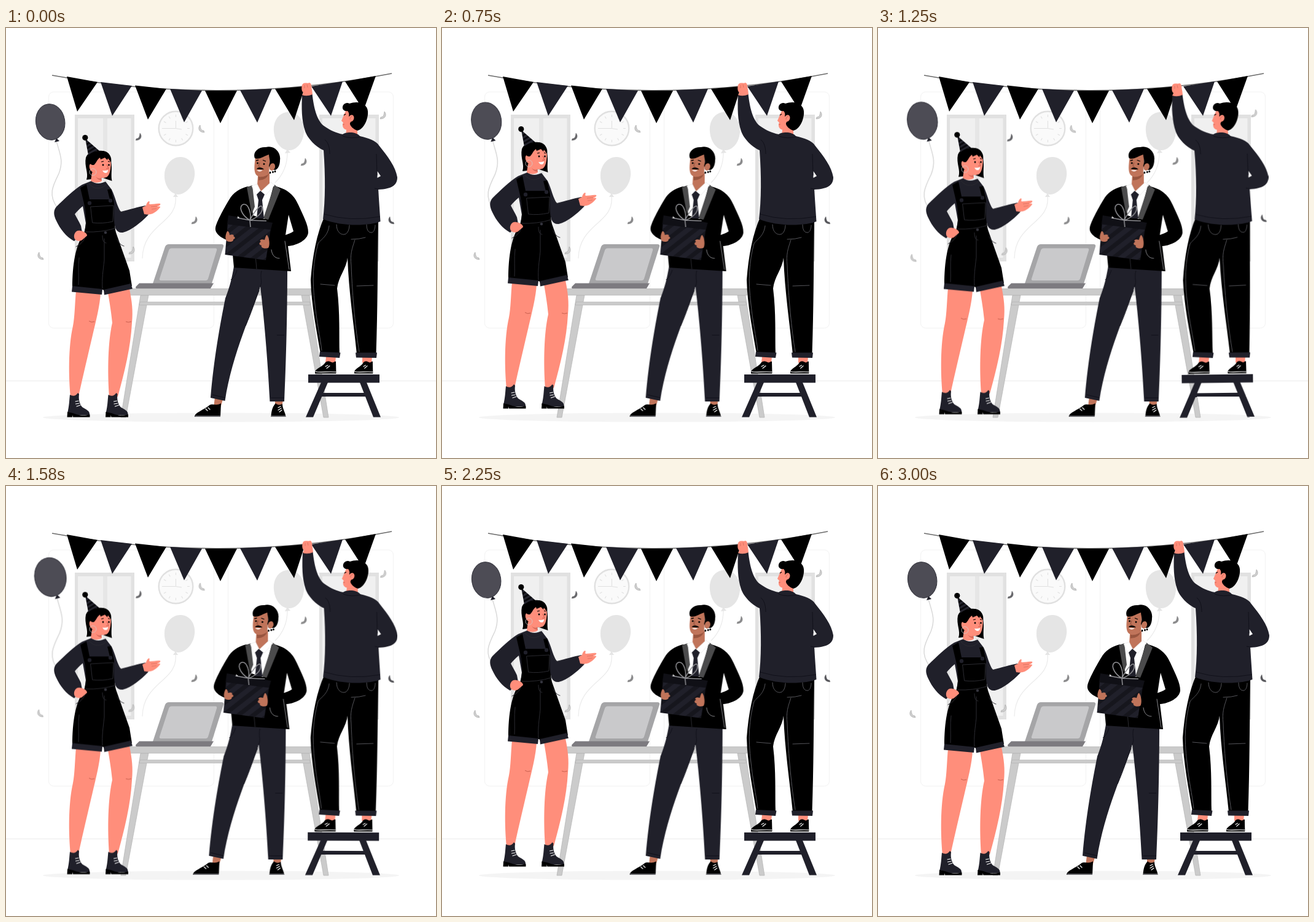
These frames come from a looping animation (700x700 px, 3040 ms). An HTML page:

```html
<!DOCTYPE html>
<html lang="en">
<head>
<meta charset="utf-8">
<title>Party preparations</title>
<style>
html, body { margin: 0; width: 100%; height: 100%; overflow: hidden; background: #fff; }
svg { display: block; width: 100%; height: 100%; }
.navy { fill: #20202a; }
.skin { fill: #ff8e7b; }
.tan { fill: #c0745a; }
.line { fill: none; stroke: #2c2c32; stroke-width: 1; stroke-linecap: round; }
.white { fill: #fff; }
.lace { fill: none; stroke: #fff; stroke-width: 1.2; stroke-linecap: round; }
.string { fill: none; stroke: #ececec; stroke-width: 1.3; }
.metal { fill: #cbcbcb; stroke: #b2b2b2; stroke-width: .7; }
</style>
</head>
<body>
<svg viewBox="0 0 700 700">
  <defs>
    <pattern id="stripes" width="15" height="15" patternUnits="userSpaceOnUse" patternTransform="rotate(52)">
      <rect width="15" height="15" fill="#20202a"/><rect width="7" height="15" fill="#16161d"/>
    </pattern>
    <pattern id="hatStripes" width="6" height="6" patternUnits="userSpaceOnUse" patternTransform="rotate(60)">
      <rect width="6" height="6" fill="#24242e"/><rect width="3" height="6" fill="#08080c"/>
    </pattern>
    <path id="bit" d="M2-6C6-2 5 6-5 6L-4 3C1 3 1-1 2-6Z"/>
    <g id="window">
      <rect x="112" y="141" width="97" height="239" fill="#e1e1e1"/>
      <path d="M117 147H158.500V374H117ZM165 147H203.500V374H165Z" fill="#f0f0f0"/>
      <path d="M158.500 147H165V374H158.500Z" fill="#e6e6e6"/>
    </g>
    <g id="boot">
      <path class="navy" d="M104 597C109 600 114 599 117 594L119 596C118 603 119 611 124 617C130 621 137 623 136 630H108L100 627C103 615 103 606 104 597Z"/>
      <path d="M100 625L109 627L115 629C122 631 130 631 136.500 629V633.500H109L108 630V633.500H99.500Z"/>
      <path class="lace" d="M113 608L118 607M113.500 612L119 611M115 616L121 614"/>
    </g>
    <g id="shoe">
      <path d="M503 562C502 555 512 553 518 547C521 541 526 542 530 544C533 546 535 542 537 543L537.500 562.500H503Z"/>
      <path class="lace" d="M504 559.500C512 561 524 559 537 560M520 551L524 549M522 554L527 550"/>
    </g>
  </defs>

  <!-- room -->
  <path d="M0 574.500H700" stroke="#ebebeb"/>
  <g fill="none" stroke="#f2f2f2">
    <rect x="69.500" y="104" width="269" height="384.500" rx="8"/>
    <rect x="361.500" y="104" width="269" height="384.500" rx="8"/>
  </g>
  <use href="#window"/>
  <use href="#window" x="398"/>
  <circle cx="276.500" cy="163.500" r="27.800" fill="#fafafa" stroke="#e0e0e0" stroke-width="2.400"/>
  <path d="M276.500 163.500H256M276.500 163.500L286 165M276.500 163.500V151" fill="none" stroke="#e0e0e0"/>
  <g id="ticks" stroke="#e0e0e0"></g>
  <path class="string" d="M276 274C281 318 223 318 222 375M458 203C458 223 452 238 438 252"/>
  <g fill="#e5e5e5">
    <path d="M285 210C300 211 309 225 307 241C305 258 292 271 280 271C266 270 257 254 258 238C259 222 271 209 285 210Z"/>
    <path d="M276 269L272 275H280Z"/>
    <path d="M457 137C472 134 484 148 485 164C486 182 476 198 462 199C448 200 437 185 436 168C435 152 443 139 457 137Z"/>
    <path d="M458 197L454 204L463 203Z"/>
  </g>
  <ellipse cx="350" cy="634" rx="290" ry="7.500" fill="#f4f4f4"/>

  <!-- table and laptop -->
  <g class="metal">
    <path d="M219 435H232L195 634H187ZM481 435H494L525 634H517Z"/>
    <path d="M218 446H495V451H217Z"/>
    <path d="M196 424.500H497V435H196Z"/>
  </g>
  <path d="M265 352H351Q355 352 354 356L335 416H239L259 356Q261 352 265 352Z" fill="#a5a5a7"/>
  <path d="M270 358.500H341Q344 358.500 343 362L329 408Q328 411 325 411H252Q249 411 250 408L265 362Q266 358.500 270 358.500Z" fill="#c9c9cb"/>
  <path d="M217 415.500H338L333 424H213Q210 424 211.500 421Z" fill="#7d7b80"/>

  <path d="M75 77Q351 128 628 74" fill="none" stroke="#6b6b6b" stroke-width="1.500"/>
  <g id="flags"></g>
  <g id="confetti"></g>

  <g id="balloon">
    <path d="M82 184C88 206 94 216 86 237C76 257 68 272 84 293" fill="none" stroke="#d9d9d9" stroke-width="1.500"/>
    <path d="M82 179L79 186L87 184Z" fill="#20202a"/>
    <ellipse cx="72.200" cy="153" rx="23.600" ry="29.300" transform="rotate(-9 72 153)" fill="#4d4c55" stroke="#33333c"/>
  </g>

  <g id="woman">
    <path class="skin" d="M114 427L154 431C153 452 146 478 141 500C134 530 125 568 118 600H105C102 570 101 520 109 485C112 470 112 450 114 427Z"/>
    <path class="skin" d="M166 431L201 425C205 445 207 460 205 480C203 520 193 560 182 600H168C165 560 166 510 173 480C171 460 169 450 166 431Z"/>
    <path d="M135 477Q139 480 144 478M195 478Q199 480 204 478" fill="none" stroke="#c9604f"/>
    <use href="#boot"/>
    <use href="#boot" x="62.500"/>

    <path class="navy" d="M124 255L139 249C146 255 156 253 162 250L172 263C178 275 181 292 187 299C200 296 215 291 227 289C233 293 234 301 231 305C219 317 205 329 190 333C180 334 176 326 176 310L178 334L127 338L130 318L125 290C119 295 115 299 112 303C115 309 119 315 122 322L124 333L111 347C98 340 88 327 82 314C77 304 77 297 82 291C95 278 112 262 124 255Z"/>
    <path class="line" d="M134 252C143 265 157 262 164 254M180 292C184 299 188 301 193 299"/>
    <path d="M121 260L131 254.500L136 279H169L165 263L171 262L176 285C176 298 174 310 179 333L201 395L205 420L160 428L158 426L108 423C108 385 113 354 127 334C132 319 130 303 128 290Z"/>
    <path class="navy" d="M108 420L157 425L156 434L107 429.500ZM159 426L203 416L206 424.500L160 434.500Z"/>
    <path class="line" d="M138 291L175 289L174 315Q157 319 141 317ZM130 332Q155 333 178 326M119 374C117 390 119 405 118 418M160 343V378C158 395 156 408 157 424M114 356Q127 350 130 337M181 344C183 350 188 354 192 355M157 338C157 347 159 349 163 350"/>
    <circle class="navy" cx="136" cy="285" r="3.200"/><circle class="navy" cx="170" cy="281" r="3.200"/>
    <circle cx="162" cy="333" r="2.300" fill="#34343d"/>

    <path class="skin" d="M121 330C114 328 110 335 111 341C112 347 120 348 124 345L132 338C132 334 127 331 121 330Z"/>
    <path class="skin" d="M222 292L228 289C229 285 231 282 233 282C235 283 232 286 234 287C240 287 247 285 251 286C253 288 247 290 246 291C250 290 253 291 250 293C247 297 243 300 239 302C234 304 228 304 225 303Z"/>
    <path d="M236 291L246 290M237 295L245 294" stroke="#d2695a" stroke-width=".7"/>

    <path d="M131 247C135 236 127 225 130 211C133 202 145 199 157 200C168 202 172 214 172 226C172 235 171 242 172.500 249L158 244Z"/>
    <path class="skin" d="M140 235L154 240L156 249C151 253 143 252 138 249Z"/>
    <path d="M146 242Q150 246 155 244L156 248Q150 248 146 242Z" fill="#d96b5b"/>
    <path class="skin" d="M139 222C136 219 134 227 138 232L143 237C147 244 159 246 165 242C170 238 172 223 170 211L150 207Z"/>
    <path d="M136 220C136 206 147 200 158 200C168 201 173 211 171 219L166 212L165 215L161 211L154 214L153 211C148 214 147 220 143 223L140 223Z"/>
    <path d="M155 218L159 217M166 217L169 218" stroke="#000" stroke-width="1.100"/>
    <circle cx="158" cy="223" r="1.400"/><circle cx="167.500" cy="223" r="1.400"/>
    <path d="M164 222L167 229L163 229" fill="none" stroke="#cf5b4d"/>
    <path class="white" d="M157 232Q162 233 166 231Q166 236 162 236Q159 236 157 232Z"/>
    <circle cx="141.500" cy="234.500" r="5.500" fill="none" stroke="#cfcfcf" stroke-width=".8"/>
    <path d="M129 180L152 200Q142 200 134 207Z" fill="url(#hatStripes)"/>
    <circle cx="128.800" cy="178.600" r="4.600"/>
  </g>

  <g id="host">
    <path class="tan" d="M340 601L353 605L349 618H338ZM438 606H451L449 617L438 615Z"/>
    <path d="M307 632C308 626 321 622 330 615C335 610 342 616 350 611L349 633H307Z"/>
    <path d="M431.500 633C432 621 435 615 439 611C443 615 447 613 450 612C450 620 455 626 455.500 633Z"/>
    <path d="M307.500 632H349M432 632H455" stroke="#66666b" stroke-width="2"/>
    <path class="lace" d="M329 618L332 621M325 620L328 623M443 618L447 616M443 622L448 619M445 625L449 622"/>
    <path class="navy" d="M371 388L458 392C458 440 457 520 453 608H429.500C426 540 420 470 414 421C403 457 368 530 356.500 607L333 602C338 540 349 480 357 440C365 420 368 405 371 388Z"/>
    <path d="M336 597L357 602M431 602H453M376 394C374 402 370 407 366 410M412 427C405 445 400 462 390 485M416 395C413 408 418 411 414 421M441 500H453" fill="none" stroke="#11111a"/>

    <path d="M393 258L440 258C460 263 470 274 476 288C484 306 492 320 492 333C491 345 474 354 459 355L464 396L371 390L367 347C355 345 339 336 341 325C343 315 354 295 363 280C370 267 380 262 393 258Z"/>
    <path class="white" d="M460 304L468 331C464 334 459 335 455 337Z"/>
    <path class="line" style="stroke:#88888c" d="M454 347L461 393M432 361C433 370 438 375 445 375"/>
    <path class="line" d="M406 370L408 392"/>
    <path class="white" d="M400 257L436 255L421 311L402 305Z"/>
    <path d="M392 259L401 256L405 291L400 303ZM437 255L447 263L427 312L419 310Z" fill="#4b4b4c"/>
    <path class="tan" d="M410 241L429 236L429 256L416 267L409 257Z"/>
    <path d="M411 242Q421 243 428 237Q424 248 411 248Z" fill="#98553f"/>
    <path class="white" d="M409 254L415 266L407 273L400 257ZM431 251L437 256L423 272L415 266Z" stroke="#ddd" stroke-width=".5"/>
    <path class="navy" d="M408 271L414 265L421 271L417 280L420 310H408L411 280Z"/>

    <path class="tan" d="M406 209C405 219 403 230 406 237C410 245 422 243 428 237L430 205Z"/>
    <path d="M405 212C401 202 411 193 423 194C436 190 448 202 446 215C446 223 443 229 439 231L430 231L428 224C431 216 428 211 428 206C421 208 412 215 405 212Z"/>
    <ellipse class="tan" cx="433.500" cy="226" rx="4.500" ry="6" transform="rotate(15 433 226)"/>
    <path d="M408 230C409 226 416 226 420 230C416 231 411 229 408 230Z"/>
    <path class="white" d="M408 231Q413 232 418 231Q413 236 408 231Z"/>
    <circle cx="409.500" cy="220" r="1.400"/><circle cx="420" cy="221.500" r="1.400"/>
    <path d="M407 216L411 215M418 215L423 217" stroke="#000" stroke-width="1.300"/>
    <path d="M413 219L411 225L414 226" fill="none" stroke="#8b4b38"/>
    <path d="M430 235V236M434.500 234V235M438 233V234" stroke="#000" stroke-width="2.600" stroke-linecap="round"/>

    <path d="M361 317L431 327L423 378L356.500 369Z" fill="url(#stripes)"/>
    <path d="M362 305L434 317L431 328.500L360 319.500Z" fill="#101016"/>
    <path d="M397 313C382 304 378 289 387 287C395 286 400 303 397 313C404 299 416 284 417 292C419 301 407 310 397 313L376 309M397 313L424 314M397 313L398 324" fill="none" stroke="#8d8d91" stroke-width="1.600"/>
    <path class="white" d="M377 306L380 309L378 310Z"/>
    <path class="tan" d="M360 331C362 330 364 334 364 337C368 335 373 337 370 339C374 340 373 344 370 344C371 348 364 349 360 347C356 344 357 336 360 331Z"/>
    <path class="tan" d="M425 337C423 337 422 342 421 345C416 343 411 346 415 348C411 350 412 353 416 354C414 358 422 360 427 358C430 354 429 342 425 337Z"/>
  </g>

  <g id="decorator">
    <path class="navy" d="M513 577H524L500 633.500H488ZM576 577H587L610 633.500H598ZM512 594H586V600H512Z"/>
    <rect class="navy" x="492" y="564" width="116" height="13.500"/>
    <path class="skin" d="M521 535H537L536 546L520 545ZM580 535H596L595 546L580 545Z"/>
    <use href="#shoe"/>
    <use href="#shoe" transform="translate(567 0) scale(.88 1) translate(-503 0)"/>
    <path d="M518 308L606 312C605 390 605 460 602.500 531H571C566 480 558 430 556 374C554 392 541 405 539 424C544 465 542 500 543 531L512 530C506 495 497 450 496 410C499 370 506 335 518 308Z"/>
    <path class="navy" d="M511 527L544.500 528.500L543 537L510 535ZM569 528.500H604L603 537L570 536.500Z"/>
    <path class="line" style="stroke:#55555a" d="M526 322C524 340 511 345 508 351C500 380 498 410 503 450C506 480 511 500 514 525M512 417L535 419M571 420L598 419M538 320C538 332 545 337 551 336C557 335 559 326 559 321M587 320C587 329 590 333 595 333C599 333 601 326 601 321M562 344Q575 344 585 341M568 345C563 360 560 368 562 387C564 440 569 490 575 527"/>
    <path class="skin" d="M555 158L572 164V175H553Z"/>
    <path class="navy" d="M482 108L498.500 107C501 130 506 150 517 159C528 167 538 171 548 173C553 169 570 168 576 176C590 179 603 184 607 191C622 210 634 225 637 243C637 256 628 262 606 263L609.500 315C595 321 550 325 516 311C520 280 520 240 517 199C505 194 491 180 487 168C481 150 481 130 482 108Z"/>
    <path class="white" d="M604.500 233L610 241L604.500 244Z"/>
    <path d="M548 176Q562 181 577 177M603 205L604 240M527 205C527 190 522 184 519 182M606 262L600 261M518 303Q560 316 609 307" fill="none" stroke="#11111a"/>
    <path class="skin" d="M482 109L484 105C480 102 481 94 483 91C487 88 491 91 494 89C498 90 497 97 498 100L499 108Q490 112 482 109Z"/>
    <path d="M486 93V98M490 92L491 97" stroke="#d2695a" stroke-width=".7"/>
    <path class="skin" d="M556 132C551 136 550 143 546 151L549 154C547 158 548 163 552 165C556 167 563 166 571 168L574 148L565 133Z"/>
    <path d="M548 131C547 124 554 120 559 123C567 120 578 120 583 125C591 130 590 141 587 150C584 159 578 166 572 167C567 166 559 159 560 155L565 145L558 144C559 140 558 137 556 135C552 136 549 134 548 131Z"/>
    <ellipse class="skin" cx="562" cy="147" rx="4.400" ry="5.700" transform="rotate(18 562 147)"/>
    <path d="M560 149Q560 144 564 144M548 157H551" fill="none" stroke="#d2695a"/>
    <path d="M550 142L553 140" stroke="#000" stroke-width="1.400"/>
  </g>
</svg>
<script>
const $ = id => document.getElementById(id);
const LOOP = 3040, CYCLE = 3000;
const LEAD = 20; // the motion is already under way at load

function add(parent, tag, attrs) {
  const el = document.createElementNS("http://www.w3.org/2000/svg", tag);
  for (const key in attrs) el.setAttribute(key, attrs[key]);
  $(parent).append(el);
}

for (let i = 0; i < 12; i++)
  add("ticks", "path", { d: "M276.5 141V145", transform: `rotate(${i * 30} 276.5 163.5)` });

// left x, left y, right x, right y, tip x, tip y
[
  [99, 79, 149, 88, 116, 136], [154, 88, 205, 94, 173, 143],
  [210, 93.5, 261, 99, 231, 149], [267, 99, 319, 102, 290, 153.500],
  [324, 102, 376, 102, 349, 155], [381, 101, 433, 99, 409, 154],
  [438, 99, 487, 95, 469, 150], [497, 95, 548, 87, 529, 143],
  [552, 87, 602, 78, 582, 134]
].forEach((p, i) => add("flags", "polygon", { points: p, fill: i % 2 ? "#20202a" : "#000" }));

// x, y, mirror, colour
[
  [216, 177, 1, "#66666a"], [318, 164, -1, "#cfcfcf"], [307, 313, 1, "#8a8a8c"],
  [485, 218, 1, "#8a8a8c"], [614, 142, 1, "#cfcfcf"], [627, 313, -1, "#55555a"],
  [205, 362, 1, "#cfcfcf"], [56, 371, -1, "#cfcfcf"]
].forEach(([x, y, flip, fill]) =>
  add("confetti", "use", { href: "#bit", fill, transform: `translate(${x} ${y}) scale(${flip} 1)`, stroke: "#888", "stroke-width": .4 }));

// steps: [time, value], linear between, resting after the last one
function move(id, steps, transform, origin = "0 0") {
  const el = $(id);
  el.style.transformOrigin = origin;
  const frames = [...steps, [LOOP, steps.at(-1)[1]]]
    .map(([time, value]) => ({ offset: time / LOOP, transform: transform(value) }));
  el.animate(frames, { duration: LOOP, iterations: Infinity }).startTime = -LEAD;
}

const rotate = v => `rotate(${v}deg)`;
const sway = [[0, 0], [375, 1], [1125, -1], [1500, 0], [1875, 1], [2625, -1], [CYCLE, 0]];
const shake = [0, -1, 2, -4, 4, -4, 4, -4, 2, -1, 0].map((v, i) => [i * CYCLE / 10, v * 1.4]);

move("decorator", sway, rotate, "561px 361px");
move("confetti", sway, rotate, "341px 257px");
move("woman", [[0, 0], [750, -14], [1500, 0], [2250, -14], [CYCLE, 0]], v => `translate(0px, ${v}px)`);
move("host", shake, v => `translate(${v}px, 0px)`);
move("balloon", [[0, 1], [300, 1.1], [975, 1], [1680, 1.1], [1900, 1]], v => `scale(${v})`, "72px 208px");
</script>
</body>
</html>
```
